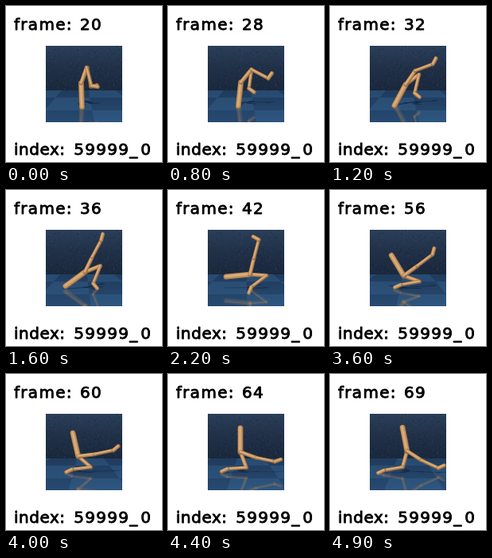
Write an HTML page with a canvas that moves like this. It is 196x196 px and loops after 5 s.

```html
<!DOCTYPE html>
<html lang="en">
<head>
<meta charset="utf-8">
<title>Walker</title>
<style>
html, body { margin: 0; width: 100%; height: 100%; overflow: hidden; background: #fff; }
canvas { position: absolute; left: 50px; top: 50px; }
svg { position: absolute; left: 0; top: 0; }
text {
  font: 20px "DejaVu Sans", sans-serif;
  letter-spacing: 1.3px;
  fill: #000; stroke: #000; stroke-width: .9px; stroke-linejoin: round;
}
</style>
</head>
<body>
<canvas id="view" width="96" height="96"></canvas>
<svg width="196" height="196">
  <text x="10" y="30">frame:</text>
  <text id="count" x="93" y="30">20</text>
  <text x="10" y="187" style="letter-spacing:.5px">index:</text>
  <text x="85.2" y="187">59999_<tspan dx="2.5">0</tspan></text>
</svg>
<script>
const LOOP = 5000, STEP = 100, FIRST = 20;
const HORIZON = 56, GROUND = 73;
const TORSO = 30, THIGH = 21, SHIN = 24, FOOT = 8;
const ctx = document.getElementById('view').getContext('2d');
const count = document.getElementById('count');

// time, torso centre x and y, torso angle, then thigh, shin, foot angles of each leg.
// The camera follows the torso, so its centre hardly moves sideways.
const poses = [
  [0,    95, 112, 88,  -71, 75,   10,  -68, 80,  -10],
  [800,  90, 111, 96,  -51, 28,  -55,  -50, 98,   35],
  [1600, 87, 112, 144, -64, -62, -75,  -22, 112,  50],
  [2800, 89, 102, 203, -80, -70, -204,  25, 172, 170],
  [3600, 85, 95,  239, -36, -37, -75,   20, 170, 155],
  [4400, 91, 83,  270,  20, 12,  -20,   69, 176, 155],
  [4900, 94, 82,  259,  33, 25,  -25,  105, 170, 155]
];

function slope(i, k) {
  const a = poses[Math.max(i - 1, 0)], b = poses[Math.min(i + 1, poses.length - 1)];
  return (b[k] - a[k]) / (b[0] - a[0]);
}

// Smooth cubic through the unevenly spaced poses
function poseAt(t) {
  let i = 0;
  while (i < poses.length - 2 && t >= poses[i + 1][0]) i++;
  const a = poses[i], b = poses[i + 1], d = b[0] - a[0], u = (t - a[0]) / d;
  const ease = u * u * (3 - 2 * u);
  return a.map((v, k) => v + (b[k] - v) * ease
    + d * u * (1 - u) * ((1 - u) * slope(i, k) - u * slope(i + 1, k)));
}

function along([x, y], deg, len) {
  const r = deg * Math.PI / 180;
  return [x + len * Math.cos(r), y + len * Math.sin(r)];
}

function legBones(hip, thigh, shin, foot) {
  const knee = along(hip, thigh, THIGH), ankle = along(knee, shin, SHIN);
  return [[hip, knee, 5], [knee, ankle, 4.4], [ankle, along(ankle, foot, FOOT), 5]];
}

function bonesAt(t) {
  const p = poseAt(t), mid = [p[1] - 50, p[2] - 50];
  const head = along(mid, p[3], TORSO / 2), hip = along(mid, p[3], -TORSO / 2);
  return [
    ...legBones(hip, ...p.slice(7, 10)),
    [hip, head, 7],
    ...legBones(hip, ...p.slice(4, 7))
  ];
}

function line(a, b, width, color) {
  ctx.strokeStyle = color;
  ctx.lineWidth = width;
  ctx.beginPath();
  ctx.moveTo(...a);
  ctx.lineTo(...b);
  ctx.stroke();
}

function drawBones(bones) {
  ctx.lineCap = 'round';
  for (const [a, b, w] of bones) {
    line(a, b, w, '#8f6844');
    line([a[0] - .3, a[1] - .4], [b[0] - .3, b[1] - .4], w - 1.5, '#c99862');
    line([a[0] - .5, a[1] - .7], [b[0] - .5, b[1] - .7], w * .25, '#deb283');
  }
}

let seed = 7;
const rand = () => (seed = seed * 16807 % 2147483647) / 2147483647;
const specks = Array.from({ length: 260 }, () => [rand() * 96, rand() * HORIZON, rand()]);

function drawSky() {
  const g = ctx.createLinearGradient(0, 0, 0, HORIZON);
  g.addColorStop(0, '#2b3f59');
  g.addColorStop(.5, '#203047');
  g.addColorStop(1, '#1a283c');
  ctx.fillStyle = g;
  ctx.fillRect(0, 0, 96, HORIZON);
  for (const [x, y, v] of specks) {
    ctx.fillStyle = v > .5 ? `rgba(110,135,165,${v * .2})` : 'rgba(8,16,28,.25)';
    ctx.fillRect(x, y, 1.2, 1.2);
  }
}

function drawFloor(shift) {
  const g = ctx.createLinearGradient(0, HORIZON, 0, 96);
  g.addColorStop(0, '#1f3b5c');
  g.addColorStop(1, '#274a70');
  ctx.fillStyle = g;
  ctx.fillRect(0, HORIZON, 96, 40);
  const rows = [HORIZON, 65, 81, 110];
  const px = (x, y) => 48 + (x * 52 + 9 - shift) * (.65 + (y - HORIZON) * .02);
  ctx.fillStyle = 'rgba(70,120,170,.24)';
  for (let r = 0; r < 3; r++) {
    for (let c = -3; c < 3; c++) {
      if ((r + c) & 1) continue;
      const y0 = rows[r], y1 = rows[r + 1];
      ctx.beginPath();
      ctx.moveTo(px(c, y0), y0);
      ctx.lineTo(px(c + 1, y0), y0);
      ctx.lineTo(px(c + 1, y1), y1);
      ctx.lineTo(px(c, y1), y1);
      ctx.fill();
    }
  }
}

function drawShadow(bones) {
  ctx.save();
  ctx.globalAlpha = .5;
  ctx.translate(0, GROUND - 6);
  ctx.scale(1, .1);
  for (const [a, b, w] of bones) line(a, b, w + 2, '#10203a');
  ctx.restore();
}

function drawReflection(bones) {
  ctx.save();
  ctx.beginPath();
  ctx.rect(0, GROUND, 96, 96 - GROUND);
  ctx.clip();
  ctx.globalAlpha = .13;
  ctx.translate(0, GROUND * 2 + 2);
  ctx.scale(1, -1);
  drawBones(bones);
  ctx.restore();
}

function draw(t) {
  const n = Math.floor(t / STEP), time = n * STEP;
  const bones = bonesAt(time);
  count.textContent = FIRST + n;
  ctx.clearRect(0, 0, 96, 96);
  drawSky();
  drawFloor(Math.max(0, time - 1200) * .008);
  drawShadow(bones);
  drawReflection(bones);
  drawBones(bones);
}

const start = performance.now();
function tick() {
  draw((performance.now() - start) % LOOP);
  requestAnimationFrame(tick);
}
tick();
</script>
</body>
</html>
```
